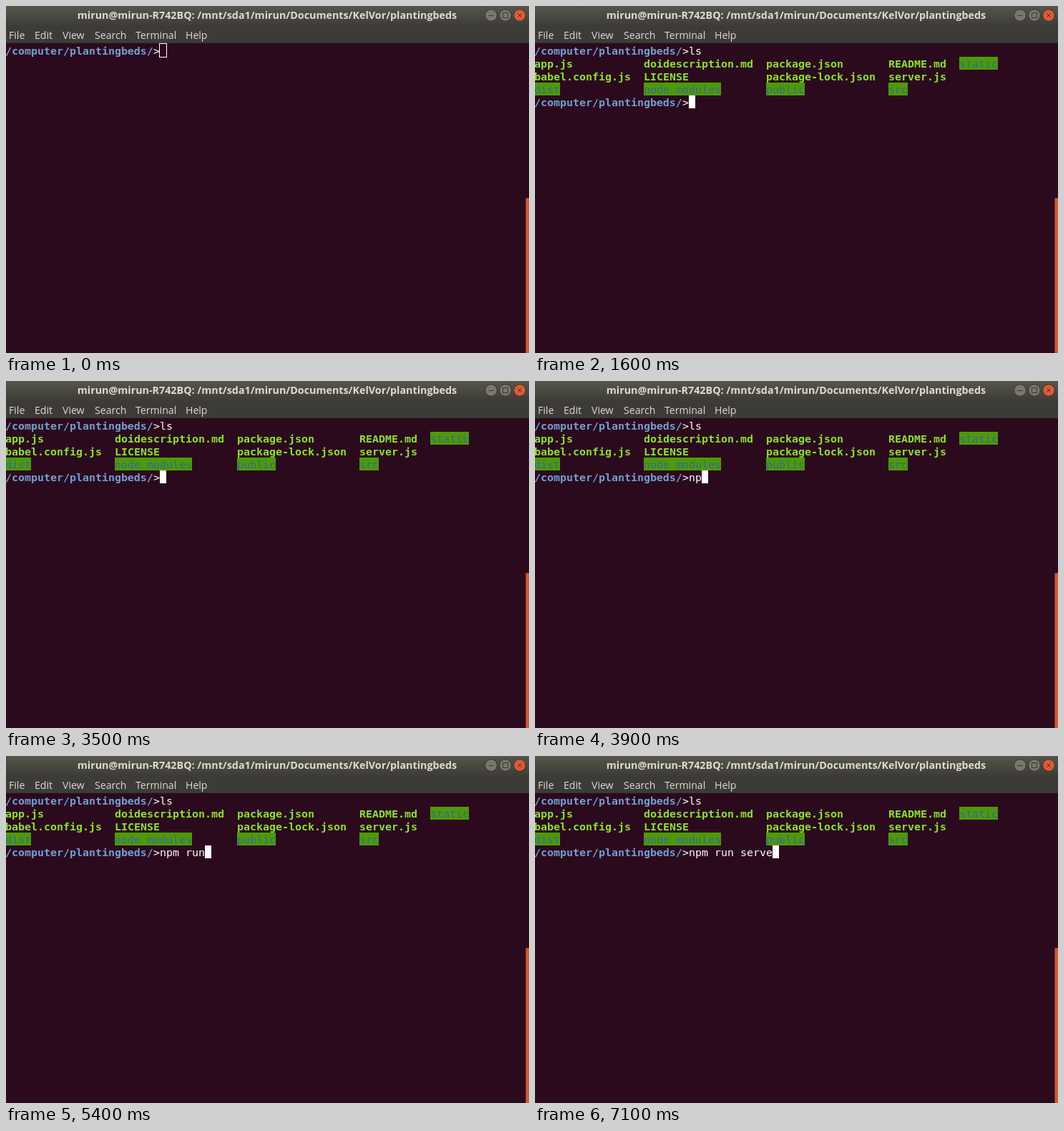
Animation of 731 by 485 pixels, one loop 8 s. Source, as an HTML page with a canvas:

```html
<!DOCTYPE html>
<html lang="en">
<head>
<meta charset="utf-8">
<title>Terminal</title>
<style>
  html, body { margin: 0; width: 100%; height: 100%; overflow: hidden; background: #2c0a1e; }
  canvas { display: block; }
</style>
</head>
<body>
<canvas id="stage" width="731" height="485"></canvas>
<script>
const ctx = document.getElementById('stage').getContext('2d');
const LOOP = 8000, CELL = 9, ROW = 18, TOP = 53;
const SANS = '"Open Sans", "Noto Sans", sans-serif';
const MONO = '"DejaVu Sans Mono", "Noto Sans Mono", monospace';
const BLUE = '#729fcf', GREEN = '#8ae234', WHITE = '#ffffff';

const PROMPT = '/computer/plantingbeds/';
const INPUT_COL = PROMPT.length + 1;
const MENU = [['File', 4], ['Edit', 40], ['View', 79], ['Search', 124], ['Terminal', 181], ['Help', 251]];
const COLUMNS = [0, 17, 36, 55, 66];
const FILES = [
  ['app.js', 'doidescription.md', 'package.json', 'README.md', '[static]'],
  ['babel.config.js', 'LICENSE', 'package-lock.json', 'server.js'],
  ['[dist]', '[node modules]', '[public]', '[src]']
];

// [time, typed text]; the listing appears when the first command is run
const FIRST = [[0, ''], [700, 'l'], [1100, 'ls']];
const LISTED = 1600;
const SECOND = [
  [1600, ''], [3600, 'n'], [3900, 'np'], [4300, 'npm'], [4400, 'npm '], [4900, 'npm r'],
  [5400, 'npm run'], [6200, 'npm run '], [6500, 'npm run s'], [6600, 'npm run se'],
  [7000, 'npm run serv'], [7100, 'npm run serve']
];
const CURSOR_OFF = [[1700, 2300], [2900, 3500], [6100, 6200]];

const colX = col => col * CELL - 1;
const rowY = row => TOP + row * ROW;
const typedAt = (steps, t) => steps.filter(([start]) => start <= t).pop()[1];

function rect(x, y, w, h, fill) {
  ctx.fillStyle = fill;
  ctx.fillRect(x, y, w, h);
}

function label(text, x, y, font, color, align = 'left') {
  ctx.font = font;
  ctx.textAlign = align;
  ctx.fillStyle = color;
  ctx.fillText(text, x, y);
}

function print(text, col, row, color, weight = 400) {
  label(text, colX(col), rowY(row) + 15, `${weight} 14.95px ${MONO}`, color);
}

function windowButton(x, fill, glyph) {
  ctx.beginPath();
  ctx.arc(x, 13, 8.3, 0, Math.PI * 2);
  ctx.fillStyle = fill;
  ctx.fill();
  ctx.lineWidth = 1;
  ctx.strokeStyle = '#37362f';
  ctx.stroke();
  ctx.stroke(new Path2D(glyph));
}

function drawFrame() {
  rect(0, 0, 731, 52, '#3c3b37');
  const shade = ctx.createLinearGradient(0, 0, 0, 28);
  shade.addColorStop(0, '#57564c');
  shade.addColorStop(1, '#3c3b37');
  rect(0, 0, 731, 28, shade);
  rect(0, 51, 731, 1, '#35342f');
  label('mirun@mirun-R742BQ: /mnt/sda1/mirun/Documents/KelVor/plantingbeds',
    365, 18, `700 14.3px ${SANS}`, '#dfdbd2', 'center');
  windowButton(678, '#7a786e', 'M674.5 13.5h7');
  windowButton(698, '#7a786e', 'M694.5 9.5h7v7h-7z');
  windowButton(718, '#e05a34', 'M715.5 10.5l5 5m0-5l-5 5');
  for (const [text, x] of MENU) label(text, x, 46, `14.1px ${SANS}`, '#dfdbd2');
  rect(0, 52, 731, 433, '#2c0a1e');
  rect(726.5, 268.5, 5, 217, '#cf5b35');
}

function drawPrompt(row, typed) {
  print(PROMPT, 0, row, BLUE, 700);
  print('>' + typed, PROMPT.length, row, WHITE);
}

function drawListing() {
  FILES.forEach((names, i) => names.forEach((name, j) => {
    const row = i + 1, col = COLUMNS[j];
    if (name[0] !== '[') return print(name, col, row, GREEN, 700);
    const folder = name.slice(1, -1);
    rect(colX(col), rowY(row), folder.length * CELL, ROW, '#4e9a06');
    print(folder, col, row, '#3465a4');
  }));
}

function drawCursor(t, col, row) {
  const x = colX(col), y = rowY(row);
  if (t < 500) {
    ctx.strokeStyle = WHITE;
    ctx.lineWidth = 1;
    ctx.strokeRect(x - 0.5, y - 0.5, CELL + 1, ROW + 1);
  } else if (!CURSOR_OFF.some(([from, to]) => t >= from && t < to)) {
    rect(x, y, CELL, ROW, WHITE);
  }
}

function draw() {
  const t = performance.now() % LOOP;
  const listed = t >= LISTED;
  const row = listed ? 4 : 0;
  const typed = typedAt(listed ? SECOND : FIRST, t);
  drawFrame();
  if (listed) {
    drawPrompt(0, 'ls');
    drawListing();
  }
  drawPrompt(row, typed);
  drawCursor(t, INPUT_COL + typed.length, row);
  requestAnimationFrame(draw);
}
draw();
</script>
</body>
</html>
```
